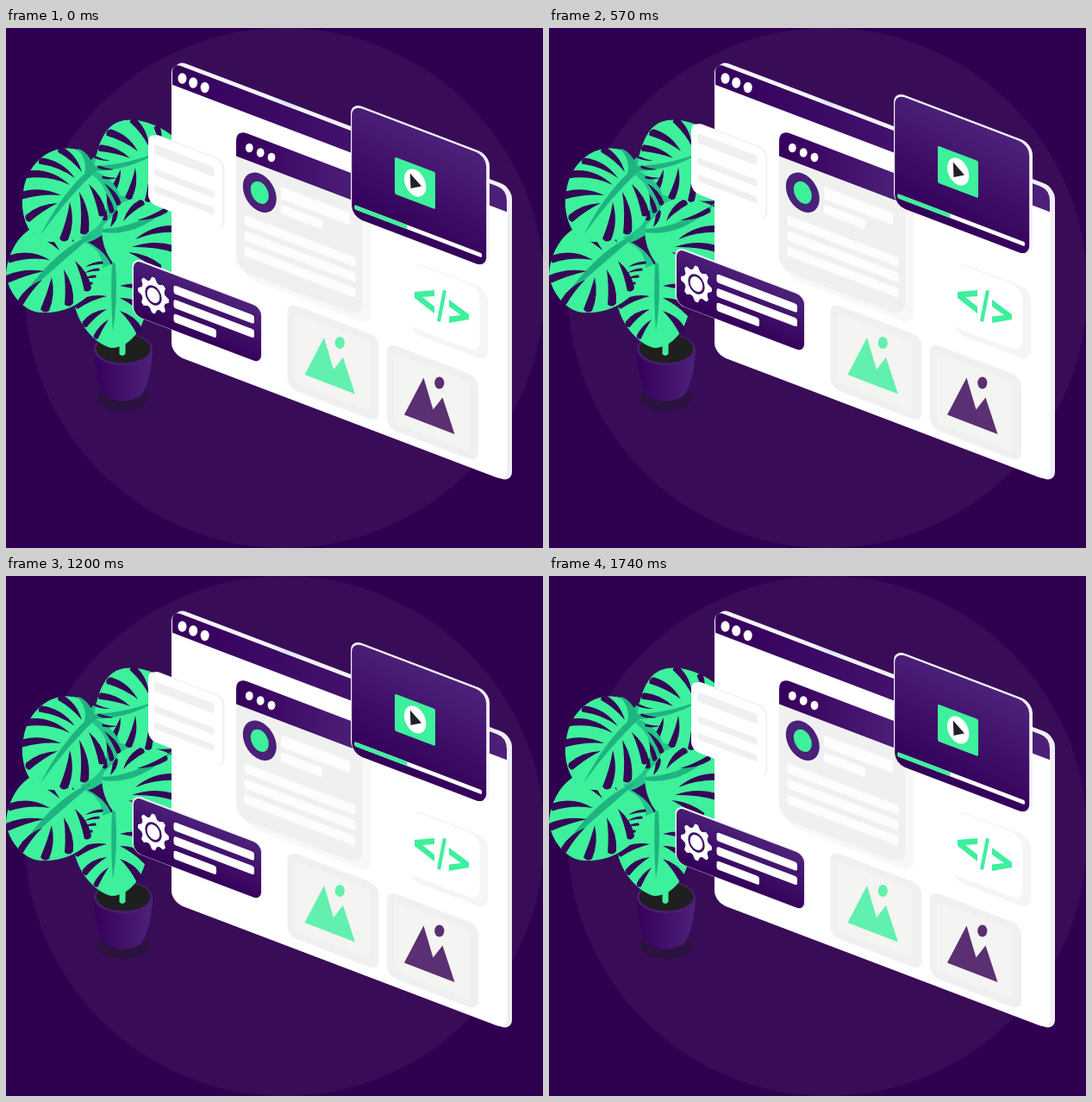
Recreate the animation shown at these times as an HTML page. Size 623 by 603 pixels, loop 1800 ms.

```html
<!DOCTYPE html>
<html lang="en">
<head>
<meta charset="utf-8">
<title>Floating panels</title>
<style>
html, body { margin: 0; height: 100%; overflow: hidden; background: #300050; }
svg { display: block; width: 623px; height: 603px; }
.leaf { fill: #3df09c; }
.back { fill: #23c48c; }
.vein { fill: #1fb380; }
.slit { fill: #350755; }
.white { fill: #fff; }
.grey { fill: #f0f0f0; }
.green { fill: #3df09c; }
</style>
</head>
<body>
<svg viewBox="0 0 623 603">
<defs>
  <linearGradient id="panel" x1=".55" y1="0" x2=".4" y2="1">
    <stop offset="0" stop-color="#4c2079"/><stop offset="1" stop-color="#330059"/>
  </linearGradient>
  <linearGradient id="bar">
    <stop offset="0" stop-color="#35005c"/><stop offset="1" stop-color="#4d217a"/>
  </linearGradient>
  <linearGradient id="edge">
    <stop offset=".29" stop-color="#f6f5fa"/><stop offset=".33" stop-color="#d5e4ff"/>
    <stop offset=".38" stop-color="#f3f2f8"/><stop offset="1" stop-color="#efeef3"/>
  </linearGradient>
  <g id="picture">
    <g transform="matrix(1 .38 0 1 0 0)">
      <rect x="326.5" y="194" width="106" height="99" rx="11" class="grey"/>
      <rect x="334.5" y="203" width="87" height="81" rx="4" fill="#f4f4f2"/>
    </g>
    <path d="M346.500 402L369 359L380 396L391 382L405 424.500Z"/>
    <ellipse cx="387.300" cy="365" rx="5.600" ry="7"/>
  </g>
</defs>

<rect width="623" height="603" fill="#300050"/>
<circle cx="323" cy="301.500" r="301.500" fill="#390c58"/>

<!-- pot -->
<ellipse cx="136" cy="429" rx="30" ry="15.500" fill="#2b123f"/>
<path d="M102 373C103 397 108 420 115 427Q136 438 156 427C164 417 169 397 170 373Z" fill="url(#bar)"/>
<ellipse cx="136" cy="372.500" rx="34" ry="18.500" fill="#4a1e76"/>
<ellipse cx="136" cy="372" rx="31.500" ry="16.500" fill="#1f1f1f"/>

<g id="plant"></g>

<!-- main window -->
<g transform="matrix(1 .38 0 1 0 0)">
  <rect x="196" y="-38" width="391" height="342.500" rx="13" fill="url(#edge)"/>
  <rect x="192" y="-34" width="389.500" height="339" rx="13" class="white"/>
  <path d="M193 -7.500V-22Q193 -33 204 -33H570Q581 -33 581 -20V-7.500Z" fill="url(#bar)"/>

  <rect x="276" y="24" width="148" height="160" rx="15" fill="#f8f8f8"/>
  <rect x="267" y="16" width="146.500" height="162" rx="15" class="grey"/>
  <path d="M267 47V30Q267 16 281 16H400Q413 16 413 30V47Z" fill="url(#bar)"/>
  <ellipse cx="294.300" cy="79" rx="19.500" ry="22" fill="#4a2079"/>
  <ellipse cx="294.300" cy="79" rx="10.500" ry="12.500" class="green"/>
  <g class="white" fill-opacity=".85">
    <rect x="319" y="63" width="80" height="14" rx="2"/>
    <rect x="319" y="83" width="48" height="11" rx="2"/>
    <rect x="276.500" y="112" width="129" height="11" rx="2"/>
    <rect x="276.500" y="130" width="129" height="11" rx="2"/>
    <rect x="276.500" y="148" width="129" height="11" rx="2"/>
  </g>

  <rect x="469" y="91" width="90" height="83.500" rx="13" fill="#f5f5f5"/>
  <rect x="462" y="93" width="87.500" height="75" rx="13" class="white"/>
</g>
<g class="white">
  <ellipse cx="204.500" cy="58.500" rx="5" ry="6.200"/>
  <ellipse cx="217.200" cy="63.500" rx="5" ry="6.200"/>
  <ellipse cx="230.700" cy="69" rx="5" ry="6.200"/>
  <ellipse cx="282.300" cy="139" rx="4.400" ry="5.300"/>
  <ellipse cx="295.200" cy="144.500" rx="4.400" ry="5.300"/>
  <ellipse cx="308" cy="150" rx="4.400" ry="5.300"/>
</g>
<path class="green" d="M474 306L497 304V311L483 312L497 323V331L474 313Z
  M507 303.500L511 305L504 341L500 339.500Z
  M514 315L537 332V338L514 342V334.500L528 333L514 323Z"/>
<use href="#picture" fill="#62f0ae"/>
<use href="#picture" x="115.500" y="46.500" fill="#5a3072"/>

<g id="float">
  <g transform="matrix(1 .38 0 1 0 0)">
    <!-- text card -->
    <rect x="169" y="57" width="84.500" height="82.500" rx="9" fill="#f3f3f3"/>
    <rect x="165" y="59" width="86" height="81" rx="9" class="white"/>
    <g class="grey">
      <rect x="172" y="69.500" width="69.500" height="11.500" rx="2"/>
      <rect x="172" y="97.500" width="69.500" height="8" rx="2"/>
      <rect x="172" y="117" width="69.500" height="8" rx="2"/>
    </g>

    <!-- settings bar -->
    <rect x="146.500" y="210" width="152" height="67" rx="11" fill="#f4f2f7"/>
    <rect x="148" y="212" width="148" height="64.500" rx="9" fill="url(#panel)"/>
    <g class="white">
      <rect x="194.500" y="224" width="93.500" height="10" rx="3"/>
      <rect x="194.500" y="240.500" width="93.500" height="10" rx="3"/>
      <rect x="194.500" y="257" width="49.500" height="10" rx="3"/>
    </g>
    <g transform="translate(171 245) scale(1 1.160)">
      <path id="gear" class="white"/>
      <circle r="8.500" fill="none" stroke="#3d0d66" stroke-width="2.300"/>
    </g>

    <!-- video -->
    <rect x="400" y="-66" width="161" height="131.500" rx="13" fill="#f4f2f7"/>
    <rect x="401.200" y="-63.500" width="156" height="129.500" rx="12" fill="url(#panel)"/>
    <rect x="451" y="-22" width="47" height="43" rx="2" class="green"/>
    <rect x="404.500" y="51.500" width="147.500" height="5" rx="1.500" class="white"/>
    <rect x="404.500" y="51.500" width="61" height="5" rx="1.500" class="green"/>
    <ellipse cx="474.700" cy="-.800" rx="12.700" ry="15.300" class="white"/>
  </g>
  <path d="M468.800 168.500L482 183.500L469.500 186Z" fill="#221f2b"/>
</g>
</svg>
<script>
const $ = id => document.getElementById(id);
const path = (cls, d) => `<path class="${cls}" d="${d}"/>`;

// Curved notch, wide at the rim (x, y) and pointed at (u, v).
function slit(x, y, u, v, bend = 0.15, w = 4.5) {
  const dx = u - x, dy = v - y, len = Math.hypot(dx, dy);
  const nx = -dy / len * w, ny = dx / len * w;
  const mx = (x + u) / 2 - bend * dy, my = (y + v) / 2 + bend * dx;
  return path('slit', `M${x + nx} ${y + ny}Q${mx + nx} ${my + ny} ${u} ${v}
    Q${mx - nx} ${my - ny} ${x - nx} ${y - ny}Q${x - dx / len * w} ${y - dy / len * w} ${x + nx} ${y + ny}Z`);
}

const leaf = (outline, vein, slits) =>
  path('leaf', outline) + path('vein', vein) + slits.map(s => slit(...s)).join('');

$('plant').innerHTML =
  path('back', 'M96 160C105 128 150 150 165 195C160 215 135 200 112 240Q80 262 36 248Q80 215 96 160Z') +
  path('back', 'M90 246Q128 262 126 300L88 306Z') +
  path('leaf', 'M132 338H139L138.500 378Q135 382 131.500 378Z') +
  // right
  leaf('M112 245C108 222 130 200 152 197Q175 197 197 210V290Q168 288 150 291Q118 278 112 245Z',
    'M112 233Q150 232 196 201Q155 243 112 237Z',
    [[196, 233, 150, 245, .15, 4], [194, 256, 146, 254, .12, 4], [178, 278, 142, 260, .1, 4],
     [186, 211, 152, 223, -.1, 3], [158, 202, 136, 224, .15, 4], [127, 212, 121, 231, -.15, 3]]) +
  // bottom
  leaf('M122 274C145 268 166 292 164 315C164 340 148 371 122 371C104 367 82 343 79 317Q88 287 122 274Z',
    'M123 272L127 273Q130 315 124 352Q121 312 123 272Z',
    [[82, 322, 117, 311, -.15, 4], [91, 344, 117, 326, -.15, 4], [104, 359, 119, 338, -.1, 3],
     [155, 352, 132, 328, .15, 4.5], [163, 330, 132, 313, .15, 4.5], [160, 302, 132, 299, .1, 3.5]]) +
  // lower left
  leaf('M94 250C112 258 118 280 106 298C92 318 70 331 42 330C20 330 2 306 0 285C2 258 18 234 40 228Q68 224 94 250Z',
    'M98 243Q62 273 18 313Q56 258 98 240Z',
    [[4, 268, 51, 269, -.18], [2, 291, 44, 282, -.1], [17, 318, 42, 292, -.12, 4],
     [45, 327, 53, 289, .1, 5], [73, 320, 67, 280, .12, 5], [95, 303, 80, 270, .12, 4.5],
     [33, 236, 62, 258, -.15, 4], [66, 231, 79, 249, -.1, 3]]) +
  [0, 1, 2, 3].map(i => slit(112 - i * 4, 272 + i * 8, 92 - i, 277 + i * 7, .1, 1.5)).join('') +
  // top
  leaf('M102 168C104 142 112 116 130 109C148 102 176 110 197 128V200Q160 203 126 192Q104 185 102 168Z',
    'M102 166Q145 165 180 142Q145 158 102 160Z',
    [[119, 121, 153, 143, -.15], [109, 139, 144, 151, -.12, 4], [147, 107, 166, 138, -.15, 4],
     [175, 115, 178, 135, -.15, 3.5], [122, 191, 133, 164, .1, 3.5], [142, 197, 150, 162, .12, 4],
     [165, 200, 166, 160, .12, 4]]) +
  // shaded gap between the two upper leaves
  path('back', 'M84 142Q98 148 103 165Q132 180 133 200Q126 220 108 232Q118 195 90 164Z') +
  [0, 1, 2].map(i => slit(131 - i * 8, 204 + i * 9, 114 - i * 4, 180 + i * 6, .12, 3)).join('') +
  [0, 1, 2].map(i => slit(102 + i * 5, 149 + i * 12, 121 + i * 4, 154 + i * 10, .1, 1.4)).join('') +
  // upper left
  leaf('M92 162C96 150 88 140 76 140C50 136 24 158 20 190C16 208 22 238 40 246C60 252 92 246 108 228C122 208 120 186 103 173Z',
    'M82 140Q90 140 98 152L105 165Q72 196 40 240Q64 194 91 169Q95 152 82 140Z',
    [[23, 170, 74, 182, -.2], [19, 194, 64, 194, -.14], [25, 221, 60, 203, -.12],
     [40, 154, 80, 174, -.17, 4], [63, 141, 88, 167, -.15, 4],
     [67, 245, 74, 202, .12, 5], [91, 237, 85, 190, .12, 5], [112, 216, 96, 181, .12, 4.5]]);

// Eight-toothed wheel: two rim points and two gap points per tooth.
const rim = [];
for (let i = 0; i < 32; i++) {
  const a = (i - .5) * Math.PI / 16, r = i % 4 < 2 ? 18 : 14.2;
  rim.push(`${r * Math.cos(a)} ${r * Math.sin(a)}`);
}
$('gear').setAttribute('d', `M${rim.join('L')}Z`);

// Rise 20 px and fall back, 1 px per step; steps last 30 and 60 ms in turn.
function draw() {
  const t = performance.now() % 1800;
  const step = 2 * Math.floor(t / 90) + (t % 90 >= 30 ? 1 : 0);
  $('float').setAttribute('transform', `translate(0 ${-Math.min(step, 40 - step)})`);
  requestAnimationFrame(draw);
}
draw();
</script>
</body>
</html>
```
